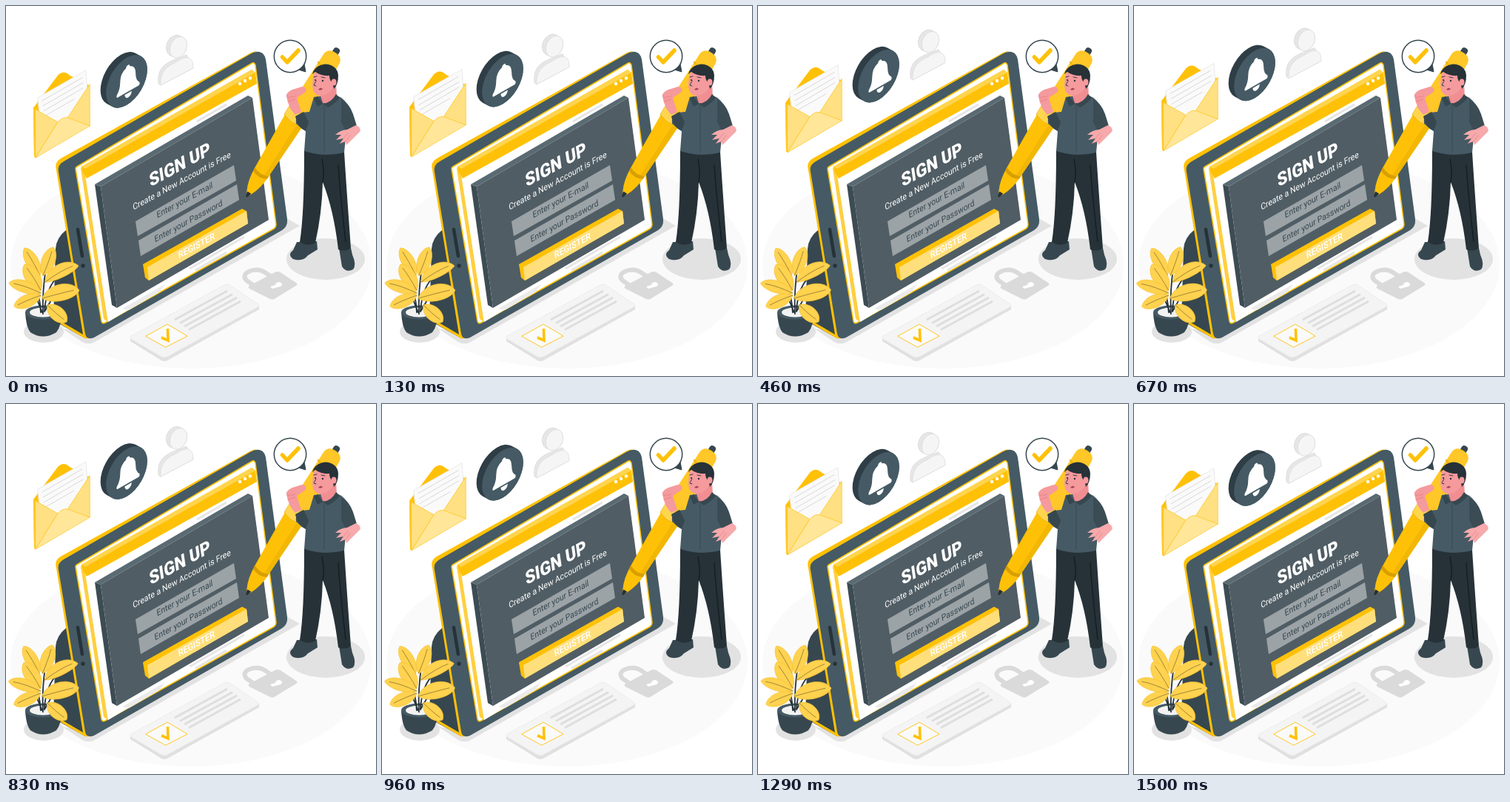
Write an HTML page that moves like this. It is 500 px wide and 500 px high and loops after 1.54 s.

```html
<!DOCTYPE html>
<html lang="en">
<head>
<meta charset="utf-8">
<title>Sign up</title>
<style>
html, body { margin: 0; width: 100%; height: 100%; overflow: hidden; background: #fff; }
svg { display: block; width: 100vw; height: 100vh; }
text { font-family: Roboto, Inter, sans-serif; text-anchor: middle; }
</style>
</head>
<body>
<svg viewBox="0 0 500 500" stroke-linejoin="round" stroke-linecap="round">
  <!-- floor and shadows -->
  <ellipse cx="250" cy="349" rx="244" ry="141" fill="#fafafa"/>
  <g fill="#e2e2e2">
    <path d="M100 440L376 285L397 297L118 455Q110 458 103 454L76 436Z"/>
    <ellipse cx="432" cy="342" rx="53" ry="28"/>
    <ellipse cx="51" cy="440" rx="27" ry="15"/>
  </g>

  <!-- card -->
  <path d="M168 448V453L210 479Q214 481 218 479L342 410V405Z" fill="#e0e0e0"/>
  <path d="M169 446L295 377Q300 375 304 378L341 403Q343 405 340 407L218 474Q214 476 210 474L169 450Q167 448 169 446Z" fill="#f4f4f4" stroke="#e8e8e8" stroke-width=".7"/>
  <path d="M189 446L218 430L245 446L216 461Z" fill="#fafafa" stroke="#ffc727"/>
  <path d="M210 448L219 452L218.500 436" fill="none" stroke="#ffc107" stroke-width="3.600" stroke-linecap="butt" stroke-linejoin="miter"/>
  <path d="M228 424L299 385M235 428.500L306 389.500M241 433L312 394M247 437.500L317 399" stroke="#dedede" stroke-width="3" stroke-linecap="butt"/>

  <!-- padlock -->
  <path d="M337 379L325 371Q318 363 330 358Q341 354 350 360L360 367" fill="none" stroke="#dadada" stroke-width="6"/>
  <path d="M329 378L363 360Q367 358 371 360L392 374Q395 376 392 378L364 395Q360 398 355 395L329 382Q326 380 329 378Z" fill="#dadada"/>
  <path d="M360 382L357 379L364 377Q364 373 370 373Q376 376 371 379L367 380Z" fill="#fff"/>

  <!-- tablet -->
  <path d="M82 302Q68 313 67 328L64 425L107 449Z" fill="#37474f"/>
  <path d="M72 425L106 445L108 450L74 430Z" fill="#ffc107"/>
  <path d="M68 222Q65 211 74 206L326 66Q337 58 344 64L375 298L113 449Q106 451 104 444Z" fill="#ffc107"/>
  <path d="M71 224Q69 215 78 210L330 65Q347 56 351 72L380 288Q381 298 373 303L119 448Q109 452 107 443Z" fill="#455a64"/>
  <path d="M96 217L333 77Q336 76 337 80L365 295Q365 299 362 301L134 428Q130 430 129 426L94 220Q94 218 96 217Z" fill="#fff" stroke="#ffc107" stroke-width="1.500"/>
  <path d="M97 302L103 338" stroke="#263238" stroke-width="4.500"/>
  <circle cx="104" cy="351" r="2.700" fill="#263238"/>

  <!-- window -->
  <path d="M102 217L107 225L138 427L132 423L101 220Z" fill="#ffcf40"/>
  <path d="M107 228L337 98L363 293L138 427Z" fill="#fff"/>
  <path d="M102 217L332 86L337 90L339 105L109 233L104 225Z" fill="#ffc107"/>
  <path d="M102 217L332 86L337 90L107 220Z" fill="#ffd54f"/>
  <g fill="#fff"><circle cx="316" cy="105" r="2.200"/><circle cx="323" cy="101" r="2.200"/><circle cx="330" cy="97.500" r="2.200"/></g>
  <path d="M258 156L298 133M248 355L322 312M256 357L298 333" stroke="#e6e6e6" stroke-width="3" stroke-linecap="butt"/>
  <path d="M157 409L215 376L207 387L166 411Z" fill="#ebebeb"/>

  <!-- form -->
  <path d="M120 241L128 244L150 408L143 404Z" fill="#3d4c54"/>
  <path d="M120 241L327 121L333 124L128 244Z" fill="#5a6a72"/>
  <path d="M128 244L333 124L355 289L150 408Z" fill="#505d64"/>
  <g fill="#9ba3a7">
    <path d="M175 291L308 215L311 236L178 311Z"/>
    <path d="M179 317L312 241L315 262L182 338Z"/>
  </g>
  <path d="M185 349L319 274L325 277L327 294L193 371L188 367Z" fill="#ffc107"/>
  <path d="M191 353L325 277L327 294L193 371Z" fill="#ffdf7c"/>
  <g id="labels"></g>

  <!-- floating icons -->
  <g class="float">
    <path d="M37 138L70 94Q78 86 86 94L113 108V160L38 204Z" fill="#ffc107"/>
    <path d="M43 124L108 87L111 125L76 163L46 155Z" fill="#fafafa" stroke="#e6e6e6" stroke-width=".8"/>
    <path d="M49 128L103 97M50 135L104 104M51 142L104 111M52 149L92 126" stroke="#d9d9d9" stroke-width="1"/>
    <g stroke="#ffc727" stroke-width=".8">
      <path d="M40 140L70 157L40 205Z" fill="#ffe082"/>
      <path d="M113 106L82 153L113 162Z" fill="#ffe082"/>
      <path d="M40 205L70 157Q78 148 86 152L113 162Z" fill="#ffe699"/>
    </g>
    <path d="M37 138L40 140V205L38 204Z" fill="#ffc727"/>
  </g>
  <g class="float">
    <g transform="matrix(.87 -.5 0 1 163 102)">
      <rect x="-44" y="-32" width="76" height="64" rx="32" transform="rotate(44)" fill="#2f3e46"/>
      <circle r="32" fill="#455a64"/>
      <path transform="translate(1 -3)" d="M1 -18Q4 -18 4 -15Q13 -12 13 -1Q13 9 19 14Q20 18 17 18H-14Q-18 18 -16 14Q-11 9 -11 -1Q-11 -12 -2 -15Q-2 -18 1 -18ZM-4 20H7Q6 26 1.500 26Q-3 26 -4 20Z" fill="#fff"/>
    </g>
  </g>
  <g class="float" stroke="#dcdcdc" stroke-width=".8">
    <path d="M206 105C204 87 212 80 224 74L244 66L253 84L209 107Z" fill="#e6e6e6"/>
    <path d="M209 107C208 89 217 82 230 76C242 67 253 67 253 83Q253 84 251 85Z" fill="#f5f5f5"/>
    <ellipse cx="229" cy="54" rx="12" ry="15" transform="rotate(24 229 54)" fill="#e6e6e6"/>
    <ellipse cx="233" cy="56" rx="11" ry="15" transform="rotate(24 233 56)" fill="#f5f5f5"/>
  </g>

  <!-- plant -->
  <path d="M26 414Q27 434 33 441Q50 452 68 441Q75 433 75 414Z" fill="#37474f"/>
  <ellipse cx="50.500" cy="414" rx="24.500" ry="9.500" fill="#455a64"/>
  <ellipse cx="50" cy="414" rx="18" ry="6.500" fill="#f2f2f2"/>
  <g id="leaves"><path d="M50 416Q49 385 54 354M47 414Q46 392 37 365M52 412Q54 385 66 370M49 414L42 397M52 413L62 396" fill="none" stroke="#263238" stroke-width="1.800"/></g>

  <!-- man: legs and shoes -->
  <path d="M393 319L388 330Q380 336 388 342Q401 346 408 337L421 329L420 318Z" fill="#37474f"/>
  <path d="M450 327L454 352Q460 361 469 356Q474 350 468 336L466 327Z" fill="#37474f"/>
  <path d="M403 195L457 197Q460 245 466 327Q459 333 449 329Q443 276 428 238Q427 280 418 320Q409 326 397 319Q403 282 403 195Z" fill="#263238"/>
  <path d="M428 238Q431 225 427 207M449 215Q452 260 459 318" fill="none" stroke="#141c20" stroke-width="1.300"/>

  <!-- pen -->
  <g transform="translate(325 258) rotate(31.500)">
    <rect x="-4" y="-236" width="9" height="14" rx="4" fill="#37474f"/>
    <path d="M-12 -219Q-11 -229 0 -229Q12 -229 13 -219L15 -126H-14Z" fill="#ffc727"/>
    <path d="M-13 -206Q0 -201 13 -206" fill="none" stroke="#e5a900" stroke-width="1.500"/>
    <path d="M-14 -124Q0 -116 15 -124L11 -38Q0 -33 -11 -38Z" fill="#ffc107"/>
    <path d="M7 -121L15 -124L11 -38L5 -36Z" fill="#f2b705"/>
    <path d="M-14.500 -138Q0 -130 15.500 -138L15 -122Q0 -114 -14.500 -122Z" fill="#ffd54f" stroke="#e5a900" stroke-width=".7"/>
    <path d="M-11 -40Q0 -34 11 -40Q11 -21 3 -5H-3Q-11 -21 -11 -40Z" fill="#ffc107"/>
    <path d="M-11 -40Q0 -34 11 -40L11 -35Q0 -29 -11 -35Z" fill="#d99f00"/>
    <path d="M-3 -7H3L1 0H-1Z" fill="#263238"/>
  </g>

  <!-- man: body -->
  <path d="M379 122Q378 117 387 113L400 109Q408 110 405 116L393 124L399 143L391 147Q382 139 379 122Z" fill="#f59a9d"/>
  <path d="M380 124L391 122M381 129L391 126" stroke="#e67f83" stroke-width=".8"/>
  <path d="M416 123L432 121L447 121Q459 125 463 139L457 198Q430 205 403 196L405 169L392 159Q390 151 400 144L410 143Z" fill="#455a64"/>
  <path d="M391 149L402 143L409 157L405 169Q393 164 391 149Z" fill="#37474f"/>
  <path d="M422 112L446 104L447 123Q438 134 428 131Z" fill="#f08e92"/>
  <path d="M421 122L428 132L421 136L416 125ZM428 132Q440 131 446 119L451 124Q444 133 435 137Z" fill="#37474f"/>
  <path d="M430 135V196" stroke="#37474f" stroke-width=".8"/>
  <path d="M453 126Q463 130 469 146L474 162L461 172L453 157Z" fill="#3b4c55"/>
  <path d="M461 167L473 161Q481 165 478 170L468 180L460 188L459 183L451 186L456 179L446 181L453 174L445 174Q451 168 461 167Z" fill="#f7a9ab"/>
  <path d="M459 183L465 175M456 179L462 172" stroke="#e67f83" stroke-width=".7"/>

  <!-- man: head -->
  <path d="M416 91Q414 101 414 108Q415 119 422 121Q433 123 440 113Q448 110 447 99L440 85Z" fill="#f59a9d"/>
  <path d="M414 92Q417 80 432 78.500Q448 80 449 94Q449 106 443 112L441 103Q437 101 437 94Q426 95 418 89Z" fill="#263238"/>
  <ellipse cx="443" cy="103" rx="3.500" ry="4.500" fill="#f59a9d"/>
  <path d="M416 96L420 95M426 96L431 97M419 101L416 107L419 108" fill="none" stroke="#263238" stroke-width=".9"/>
  <circle cx="418" cy="100" r="1.100" fill="#263238"/><circle cx="428" cy="101" r="1.200" fill="#263238"/>
  <path d="M422 113Q425 109 428 112Q426 115 422 113Z" fill="#a8484f"/>

  <!-- speech bubble -->
  <path d="M395 86L405 89L403 78Z" fill="#37474f" stroke="#37474f"/>
  <circle cx="384" cy="68" r="21.700" fill="#fff" stroke="#37474f" stroke-width="1.500"/>
  <path d="M373.500 69L380 76L395 60" fill="none" stroke="#ffc107" stroke-width="5.500"/>
</svg>
<script>
const NS = 'http://www.w3.org/2000/svg';
const LOOP = 1540, PEAK = 710;
const labels = document.getElementById('labels');
const leaves = document.getElementById('leaves');
const floats = document.querySelectorAll('.float');

function add(parent, tag, attrs) {
  const el = document.createElementNS(NS, tag);
  for (const key in attrs) el.setAttribute(key, attrs[key]);
  return parent.appendChild(el);
}

// Text laid on the leaning plane of the form
function label(str, x, y, size, fill, weight = 400) {
  add(labels, 'text', {
    transform: `matrix(.87 -.475 .145 1 ${x} ${y})`,
    'font-size': size, 'font-weight': weight, fill
  }).textContent = str;
}

// Leaf from base to tip; bend shifts its middle sideways
function leaf(bx, by, tx, ty, w, bend = 0) {
  const dx = tx - bx, dy = ty - by, len = Math.hypot(dx, dy);
  const nx = -dy / len * w * .67, ny = dx / len * w * .67;
  const at = (k, s) => `${bx + dx * k + nx * (s + bend)} ${by + dy * k + ny * (s + bend)}`;
  add(leaves, 'path', {
    d: `M${bx} ${by}C${at(.2, 1)} ${at(.85, 1)} ${tx} ${ty}C${at(.85, -1)} ${at(.2, -1)} ${bx} ${by}Z`,
    fill: '#ffd24f', stroke: '#f5c232', 'stroke-width': .7
  });
  add(leaves, 'path', {
    d: `M${bx} ${by}Q${at(.5, .1)} ${at(.85, -bend * .5)}`,
    fill: 'none', stroke: '#8a7430', 'stroke-width': .8
  });
}

label('SIGN UP', 236, 222.5, 24.3, '#fff', 900);
label('Create a New Account is Free', 238, 240, 11.6, '#fff');
label('Enter your E-mail', 242, 266, 11.6, '#37474f');
label('Enter your Password', 247, 294.5, 11.5, '#37474f');
label('REGISTER', 258, 328, 12.4, '#fff', 500);

leaf(46, 364, 25, 327, 17);
leaf(50, 364, 64, 326, 18);
leaf(53, 373, 98, 351, 18, -.5);
leaf(47, 384, 25, 349, 20);
leaf(47, 388, 4, 374, 16, .2);
leaf(47, 391, 11, 406, 17);
leaf(49, 395, 99, 384, 22, -.2);
leaf(56, 404, 82, 427, 19);

function draw(now) {
  const lift = (1 + Math.cos((now % LOOP - PEAK) / LOOP * 2 * Math.PI)) / 2;
  for (const el of floats) el.setAttribute('transform', `translate(0 ${-9.6 * lift})`);
  leaves.setAttribute('transform', `rotate(${-.7 * lift} 50 425)`);
}

const start = performance.now();
function tick() {
  draw(performance.now() - start);
  requestAnimationFrame(tick);
}
tick();
</script>
</body>
</html>
```
